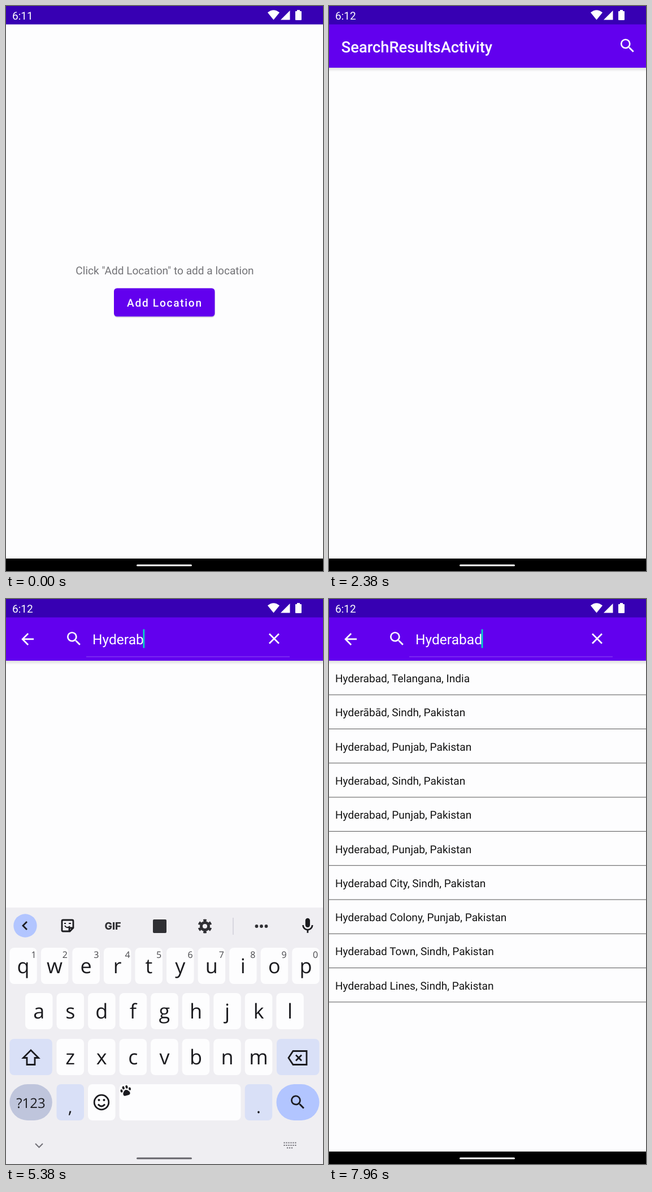
These frames come from a looping animation (561x998 px, 8000 ms). An HTML page:

```html
<!DOCTYPE html>
<html lang="en">
<head>
<meta charset="utf-8">
<title>Location search</title>
<style>
html, body { margin: 0; width: 100%; height: 100%; overflow: hidden; background: #000; }
svg { display: block; width: 100%; height: 100%; font-family: Roboto, sans-serif; text-rendering: geometricPrecision; }
.line { fill: none; stroke: #1b1b1f; stroke-width: 2.8; }
.keys { font-family: "Open Sans", "Noto Sans", sans-serif; fill: #1b1b1f; text-anchor: middle; }
</style>
</head>
<body>
<svg viewBox="0 0 561 998">
  <defs>
    <path id="lens" transform="scale(1.364)" d="M15.5 14h-.79l-.28-.27A6.47 6.47 0 0 0 16 9.5 6.5 6.5 0 1 0 9.5 16c1.61 0 3.09-.59 4.23-1.57l.27.28v.79l5 4.99L20.49 19l-4.99-5zm-6 0C7.01 14 5 11.99 5 9.5S7.01 5 9.5 5 14 7.01 14 9.5 11.99 14 9.5 14z"/>
    <linearGradient id="shade" x2="0" y2="1">
      <stop stop-color="#000" stop-opacity=".13"/><stop offset="1" stop-color="#000" stop-opacity="0"/>
    </linearGradient>
  </defs>
  <rect width="561" height="998" fill="#fdfdfe"/>

  <g id="home">
    <rect width="561" height="998" fill="#fdfdfe"/>
    <text x="281" y="474" font-size="19.1" fill="#737377" text-anchor="middle">Click "Add Location" to add a location</text>
    <rect x="191" y="500.5" width="179" height="50" rx="6" fill="#000" opacity=".12"/>
    <rect x="191" y="498.5" width="178.500" height="50" rx="5.500" fill="#6200ee"/>
    <rect id="press" x="191" y="498.5" width="178.500" height="50" rx="5.500" fill="#fff"/>
    <text x="214" y="531" font-size="19.1" font-weight="500" letter-spacing="1.7" fill="#fff">Add Location</text>
  </g>

  <g id="search">
    <rect y="32" width="561" height="944" fill="#fdfdfe"/>
    <g id="list" font-size="19.1" fill="#141414"></g>
    <rect y="109" width="561" height="7" fill="url(#shade)"/>
    <rect y="32" width="561" height="77" fill="#6200ee"/>
    <g id="title" fill="#fff">
      <text x="21.800" y="82" font-size="27.3" font-weight="500">SearchResultsActivity</text>
      <use href="#lens" x="511.800" y="53.800"/>
    </g>
    <g id="field" fill="#fff">
      <path transform="translate(21.800 54.600) scale(1.364)" d="M20 11H7.830l5.590-5.590L12 4l-8 8 8 8 1.410-1.410L7.830 13H20z"/>
      <use href="#lens" x="103.900" y="53.800"/>
      <rect id="under" x="142" y="101.5" width="360" height="1"/>
      <text id="hint" x="153" y="80" font-size="24.55" fill-opacity=".5">Search location</text>
      <text id="query" x="153" y="80" font-size="24.55"></text>
      <rect id="caret" y="53.5" width="2.700" height="33" fill="#03dac5"/>
      <path id="clear" d="M466 61.500l17 17m0-17l-17 17" stroke="#fff" stroke-width="2.700"/>
    </g>
    <path id="spin" d="M280.500 518a24.500 24.500 0 1 1-.01 0" pathLength="1" fill="none" stroke="#03dac5" stroke-width="5.500" stroke-linecap="square"/>
  </g>

  <rect width="561" height="32.500" fill="#3700b3"/>
  <text id="clock" x="11" y="24" font-size="19.1" fill="#fff"></text>
  <path fill="#fff" d="M463 11.500Q473.500 3 484 11.500L473.500 24.500ZM486 24.500H502.500V8ZM513 9h2V7h5v2h2q1 0 1 1v14q0 1-1 1h-9q-1 0-1-1V10q0-1 1-1z"/>
  <rect y="976" width="561" height="22" fill="#000"/>

  <g id="board">
    <rect y="545" width="561" height="455" fill="#efeef2"/>
    <circle cx="34" cy="577" r="20.700" fill="#b2c5ff"/>
    <path id="fold" class="line" d="M37 570l-7 7 7 7"/>
    <g id="tools" fill="#303034">
      <path class="line" d="M101 567h16q2 0 2 2v12l-6 6h-12q-2 0-2-2v-16q0-2 2-2zM112 587v-6h6" stroke-width="2.500"/>
      <path class="line" d="M104 577q4 6 9 1M103 573h3M111 573h4" style="stroke-width:2"/>
      <text x="189" y="583.500" font-family="Inter, sans-serif" font-size="18" font-weight="800" text-anchor="middle">GIF</text>
      <rect x="260" y="566" width="24" height="24" rx="2"/>
      <g fill="none" stroke="#303034">
        <circle cx="352" cy="578" r="6.600" stroke-width="5"/>
        <circle cx="352" cy="578" r="10" stroke-width="5" pathLength="12" stroke-dasharray="1" stroke-dashoffset="-.5"/>
      </g>
      <rect x="401.500" y="563" width="1" height="30" fill="#c0c0cc"/>
      <circle cx="443.500" cy="578" r="2.900"/><circle cx="452" cy="578" r="2.900"/><circle cx="460.500" cy="578" r="2.900"/>
    </g>
    <path transform="translate(517.500 561) scale(1.364)" fill="#1b1b1f" d="M12 14c1.660 0 3-1.340 3-3V5c0-1.660-1.340-3-3-3S9 3.340 9 5v6c0 1.660 1.340 3 3 3zm5-3c0 2.760-2.240 5-5 5s-5-2.240-5-5H5c0 3.530 2.610 6.430 6 6.920V21h2v-3.080c3.390-.49 6-3.390 6-6.920h-2z"/>
    <g id="keys" class="keys"></g>
    <path class="line" d="M44 797l13.500 13.500h-6.500V822.500H37V810.500H30.500z"/>
    <path class="line" d="M500 810.500l8-12h24v24h-24zM513 805.500l10 10m0-10l-10 10"/>
    <circle class="line" cx="169" cy="889" r="12.800"/>
    <path class="line" d="M163 892.500q6 7 12 0"/>
    <circle cx="164.500" cy="885" r="2" fill="#1b1b1f"/><circle cx="173.500" cy="885" r="2" fill="#1b1b1f"/>
    <g fill="#1b1b1f" transform="rotate(-15 212 868)">
      <path d="M212 867q3 0 6 5 1 5-3 5h-6q-4 0-3-5 3-5 6-5z"/>
      <ellipse cx="204.500" cy="867" rx="2" ry="2.700"/><ellipse cx="209" cy="862.500" rx="2" ry="2.900"/>
      <ellipse cx="215" cy="862.500" rx="2" ry="2.900"/><ellipse cx="219.500" cy="867" rx="2" ry="2.700"/>
    </g>
    <use href="#lens" x="500" y="872.500" fill="#1b1b1f"/>
  </g>
  <g id="nav">
    <path d="M52 962l6.500 6.500 6.500-6.500" fill="none" stroke="currentColor" stroke-width="2"/>
    <path d="M491.500 960.500h22M491.500 965h22M497 969.500h11" fill="none" stroke="currentColor" stroke-width="2.200" stroke-dasharray="2.200 1.760"/>
  </g>
  <rect id="pill" x="231" y="986.500" width="98" height="3" rx="1.500"/>
</svg>
<script>
const LOOP = 8000, OPEN = 1290, EXPAND = 3460, SUBMIT = 6790, SPIN = 6850, HIDE = 6900, RESULTS = 7500;
const WORD = "Hyderabad", TYPED = [4330, 4500, 4670, 4840, 5000, 5160, 5320, 5560, 5740];
const PLACES = ["Hyderabad, Telangana, India", "Hyderābād, Sindh, Pakistan", "Hyderabad, Punjab, Pakistan",
  "Hyderabad, Sindh, Pakistan", "Hyderabad, Punjab, Pakistan", "Hyderabad, Punjab, Pakistan",
  "Hyderabad City, Sindh, Pakistan", "Hyderabad Colony, Punjab, Pakistan",
  "Hyderabad Town, Sindh, Pakistan", "Hyderabad Lines, Sindh, Pakistan"];

const $ = id => document.getElementById(id);
const set = (id, attrs) => { for (const k in attrs) $(id).setAttribute(k, attrs[k]); };
const show = (id, on) => { $(id).style.display = on ? "" : "none"; };
const part = (t, from, length) => Math.min(1, Math.max(0, (t - from) / length));
const easeOut = x => 1 - (1 - x) ** 3;
const smooth = x => x * x * (3 - 2 * x);

$("list").innerHTML = PLACES.map((place, i) =>
  `<text x="11" y="${147 + i * 60.3}">${place}</text>
   <rect y="${168.7 + i * 60.3}" width="561" height="1" fill="#555"/>`).join("");

function key(x, y, w, label = "", fill = "#fdfdfe", rx = 8, size = 36, base = 45) {
  return `<rect x="${x}" y="${y}" width="${w}" height="64" rx="${rx}" fill="${fill}"/>
    <text x="${x + w / 2}" y="${y + base}" font-size="${size}">${label}</text>`;
}
const row = (letters, x, y) => [...letters].map((c, i) => key(x + i * 55.55, y, 48.5, c)).join("");
const hints = [..."1234567890"].map((n, i) =>
  `<text x="${49 + i * 55.4}" y="634" font-size="16" fill="#46464a">${n}</text>`).join("");
const SOFT = "#d9e0f7";
$("keys").innerHTML = row("qwertyuiop", 6.3, 616) + hints + row("asdfghjkl", 34, 696) +
  key(6.3, 777, 75.5, "", SOFT) + row("zxcvbnm", 89.5, 777) + key(479, 777, 75.5, "", SOFT) +
  key(6.3, 857, 75.5, "?123", "#bfc5dc", 32, 24, 42) + key(89.5, 857, 48.5, ",", SOFT, 8, 30, 51) +
  key(145, 857, 48.5) + key(200.5, 857, 215) + key(422.7, 857, 48.5, ".", SOFT, 8, 30, 51) +
  key(478.5, 857, 76, "", "#b2c5ff", 32);

function draw(t) {
  $("clock").textContent = t < 1710 ? "6:11" : "6:12";

  const slide = easeOut(part(t, OPEN, 400));
  show("home", slide < 1);
  show("search", t >= OPEN);
  set("home", { transform: `translate(${-56 * slide} 0)` });
  set("search", { transform: `translate(${56 * (1 - slide)} 0)`, opacity: part(t, OPEN + 50, 83) });
  set("press", { opacity: 0.22 * part(t, 1100, 100) * (1 - part(t, 1220, 150)) });

  show("title", t < EXPAND);
  show("field", t >= EXPAND);
  const count = TYPED.filter(at => at <= t).length;
  $("query").textContent = WORD.slice(0, count);
  show("hint", !count);
  show("clear", count);
  set("under", { opacity: 0.9 - 0.6 * part(t, 3700, 150) });
  const width = count ? $("query").getComputedTextLength() : 0;
  set("caret", { x: 152.7 + Math.max(0, width - 1) });
  const since = t - (count ? TYPED[count - 1] : EXPAND);
  show("caret", since % 1000 < 500);

  // Indeterminate ring: the head runs ahead, then the tail catches up.
  const age = Math.max(0, t - SPIN), cycle = age % 1333 / 1333;
  const head = 0.75 * smooth(part(cycle, 0, 0.5)), tail = 0.75 * smooth(part(cycle, 0.5, 0.5));
  show("spin", t >= SPIN && t < RESULTS);
  set("spin", {
    "stroke-dasharray": `${head - tail + 0.001} 2`, "stroke-dashoffset": -tail,
    transform: `rotate(${90 * cycle + 720 * age / 4444} 280.5 542.5)`
  });
  show("list", t >= RESULTS);

  const shown = easeOut(part(t, EXPAND, 290)), hidden = part(t, HIDE, 250) ** 2;
  set("board", { transform: `translate(0 ${455 * (1 - shown + hidden)})` });
  show("board", t >= EXPAND && hidden < 1);
  show("tools", t < SUBMIT);
  set("fold", { d: t < SUBMIT ? "M37 570l-7 7 7 7" : "M31 570l7 7-7 7" });

  const dark = part(t, 3740, 150) * (1 - part(t, HIDE + 100, 120));
  const mix = to => Math.round(255 + (to - 255) * dark);
  const tone = `rgb(${mix(100)},${mix(99)},${mix(106)})`;
  set("pill", { fill: tone });
  set("nav", { color: tone, opacity: 0.9 });
  show("nav", t >= EXPAND && t < SUBMIT);
}

function frame(now) {
  draw(now % LOOP);
  requestAnimationFrame(frame);
}
draw(0);
requestAnimationFrame(frame);
</script>
</body>
</html>
```
